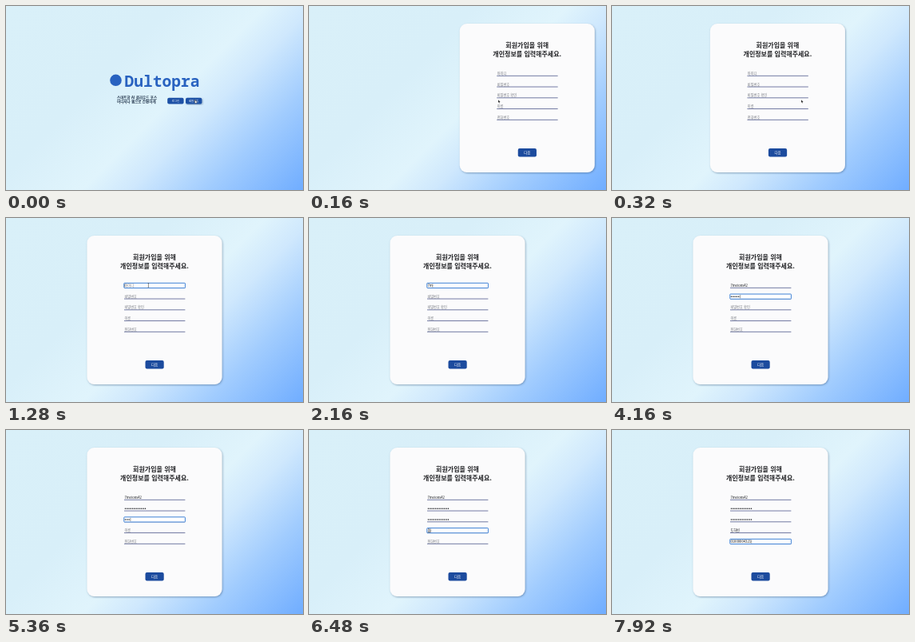
An HTML page for the animation above (8000 ms loop, 372 by 230 pixels).

```html
<!DOCTYPE html>
<html lang="ko">
<head>
<meta charset="utf-8">
<title>회원가입</title>
<style>
  html, body { margin: 0; width: 100%; height: 100%; overflow: hidden; }
  svg { display: block; width: 372px; height: 230px; }
  text { font-family: "Noto Sans CJK KR", "Noto Sans CJK", "Noto Sans", sans-serif; }
  .mid { text-anchor: middle; }
  .brand { font: 700 19.6px "Noto Sans Mono", monospace; fill: #2862c0; }
  .lead { font-size: 4.55px; font-weight: 700; fill: #27394f; }
  .title { font-size: 8px; font-weight: 700; fill: #202124; }
  .field { font-size: 4.22px; }
  .label { font-size: 3.4px; font-weight: 500; fill: #fff; }
</style>
</head>
<body>
<svg viewBox="0 0 372 230">
  <defs>
    <linearGradient id="sky" gradientUnits="userSpaceOnUse" x1="35.5" y1="-35.5" x2="336.5" y2="265.5">
      <stop offset="0" stop-color="#d9f0f9"/>
      <stop offset=".35" stop-color="#d8eff9"/>
      <stop offset=".54" stop-color="#e0f4fc"/>
      <stop offset=".64" stop-color="#cfe8fd"/>
      <stop offset=".8" stop-color="#a1ccfe"/>
      <stop offset="1" stop-color="#70adff"/>
    </linearGradient>
    <filter id="shade" x="-10%" y="-10%" width="120%" height="120%">
      <feDropShadow dx=".8" dy="1" stdDeviation="1.1" flood-color="#34597f" flood-opacity=".5"/>
    </filter>
  </defs>
  <rect width="372" height="230" fill="url(#sky)"/>

  <g id="landing">
    <circle cx="137.5" cy="92.8" r="7.3" fill="#2862c0"/>
    <text class="brand" x="148.5" y="100.5">Dultopra</text>
    <text class="lead" x="139" y="115.8">스마트한 AI 클라우드 포스</text>
    <text class="lead" x="139" y="121.4">어디서나 웹으로 간편하게</text>
    <rect x="202.2" y="114.8" width="20.4" height="7.8" rx="2" fill="#1d51a6"/>
    <rect x="225" y="114.8" width="20.4" height="7.8" rx="2" fill="#1d51a6" filter="url(#shade)"/>
    <text class="label mid" x="212.4" y="120">로그인</text>
    <text class="label mid" x="235.2" y="120">회원가입</text>
  </g>

  <g id="card">
    <rect x="101.5" y="22" width="169" height="186" rx="9" fill="#fbfbfc" filter="url(#shade)"/>
    <text class="title mid" x="186" y="52.3">회원가입을 위해</text>
    <text class="title mid" x="186" y="62.5">개인정보를 입력해주세요.</text>
    <g id="form"></g>
    <rect x="174.5" y="178" width="23.2" height="10.6" rx="2" fill="#1c4b9e"/>
    <text class="label mid" style="font-size:4.5px" x="186.1" y="185">다음</text>
  </g>

  <path id="arrow" d="M0 0V3.8L.9 3L1.5 4.3L2.1 4L1.5 2.8H2.7Z" fill="#111" stroke="#fff" stroke-width=".25"/>
  <path id="hand" d="M-.4 0V2.1L-1.3 1.7L-.2 4.1H1.8L2.2 1.6L.4 1.4V0Z" fill="#fff" stroke="#111" stroke-width=".4"/>
  <path id="beam" d="M-.7 -2.3H.7M0 -2.3V2.3M-.7 2.3H.7" fill="none" stroke="#222" stroke-width=".5"/>
</svg>
<script>
const LOOP = 8000, STEP = 80, ROW = 13.75;
const $ = id => document.getElementById(id);
const every = (start, gap, count) => Array.from({ length: count }, (_, i) => start + i * gap);
const prefixes = text => [...text].map((_, i) => text.slice(0, i + 1));
const dots = prefixes('•'.repeat(12));

const fields = [
  { label: '아이디', focus: 1200, values: prefixes('7melons42'),
    keys: [1840, 2080, 2240, 2400, 2640, 2800, 3040, 3200, 3360] },
  { label: '비밀번호', focus: 3600, secret: true, values: dots,
    keys: [...every(3840, 80, 8), ...every(4640, 80, 4)] },
  { label: '비밀번호 확인', focus: 5040, secret: true, values: dots, keys: every(5200, 80, 12) },
  { label: '이름', focus: 6240, composing: true,
    values: ['ㄷ', '도', '돟', '도하', '도합', '도하비', '도하빈'], keys: every(6320, 80, 7) },
  { label: '전화번호', focus: 6960, values: prefixes('01000004321'), keys: every(7120, 80, 11) }
];

function add(parent, tag, attrs) {
  const node = document.createElementNS('http://www.w3.org/2000/svg', tag);
  for (const name in attrs) node.setAttribute(name, attrs[name]);
  return parent.appendChild(node);
}

const show = (node, on) => node.setAttribute('visibility', on ? 'visible' : 'hidden');
const place = (node, x, y) => node.setAttribute('transform', `translate(${x} ${y})`);

fields.forEach((field, i) => {
  const g = add($('form'), 'g', { transform: `translate(148 ${81.2 + i * ROW})` });
  field.line = add(g, 'path', { d: 'M0 6.1H76.4', stroke: '#4e588c', 'stroke-width': .8 });
  field.ring = add(g, 'rect', { x: -.2, y: .1, width: 76.6, height: 6.2, rx: .6,
    fill: '#fff', stroke: '#3f82d6', 'stroke-width': 1 });
  field.text = add(g, 'text', { class: 'field', x: .4, y: 4.7 });
  field.mask = add(g, 'g', { fill: '#17191d' });
  if (field.secret) {
    field.values.forEach((_, n) => add(field.mask, 'circle', { cx: 1.5 + n * 2.27, cy: 3.3, r: .78 }));
  }
  field.under = add(g, 'path', { stroke: '#222', 'stroke-width': .4 });
  field.caret = add(g, 'path', { stroke: '#222', 'stroke-width': .45 });
});

function drawField(field, i, t) {
  const next = fields[i + 1];
  const active = t >= field.focus && (!next || t < next.focus);
  const typed = field.keys.filter(key => key <= t).length;
  const value = typed ? field.values[typed - 1] : '';
  const masked = field.secret && typed > 0;

  show(field.ring, active);
  field.text.textContent = masked ? '' : value || field.label;
  field.text.setAttribute('fill', typed ? '#17191d' : '#74777e');
  [...field.mask.children].forEach((dot, n) => show(dot, n < typed));

  const width = masked ? .4 + typed * 2.27 : typed ? field.text.getComputedTextLength() : 0;
  const since = t - (typed ? field.keys[typed - 1] : field.focus);
  field.caret.setAttribute('d', `M${width + .7} 1.2V5.3`);
  show(field.caret, active && since % 1060 < 530);
  field.under.setAttribute('d', `M.4 5.3H${width + .4}`);
  show(field.under, active && field.composing && typed > 0);
}

function drawPointer(t) {
  const p = Math.min(1, Math.max(0, (t - 560) / 560));
  const e = p * p * (3 - 2 * p);
  const x = 237 - 58.6 * e, y = 117.3 - 33.3 * e;
  const overField = p === 1;
  show($('hand'), t < 80);
  show($('arrow'), t >= 80 && !overField);
  show($('beam'), overField && t < 1760);
  for (const id of ['hand', 'arrow', 'beam']) place($(id), x, y);
}

function draw(t) {
  const entered = t >= 80;
  show($('landing'), !entered);
  $('card').style.display = entered ? '' : 'none';
  place($('card'), 250 * Math.exp((40 - t) / 114), 0);
  fields.forEach((field, i) => drawField(field, i, t));
  drawPointer(t);
}

const began = performance.now();
function tick() {
  const t = (performance.now() - began) % LOOP;
  draw(Math.floor(t / STEP) * STEP);
  requestAnimationFrame(tick);
}
tick();
</script>
</body>
</html>
```
